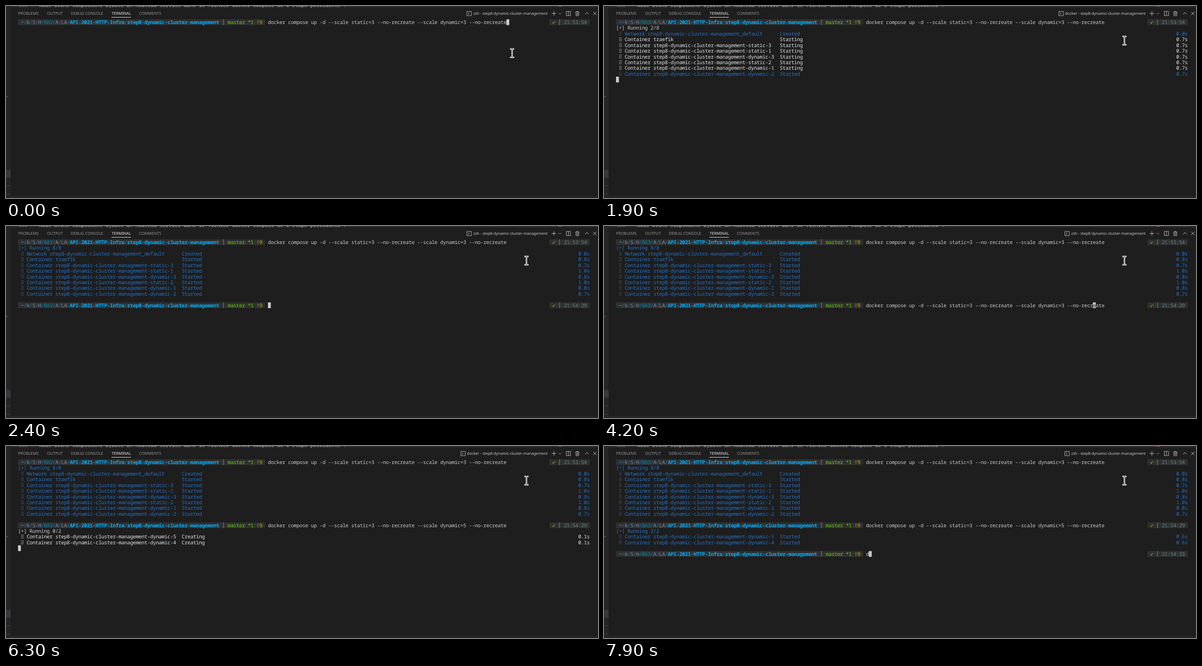
These frames come from a looping animation (1280x416 px, 8 s). An HTML page with a canvas:

```html
<!DOCTYPE html>
<html lang="en">
<head>
<meta charset="utf-8">
<title>Terminal scaling</title>
<style>
html, body { margin: 0; width: 100%; height: 100%; overflow: hidden; background: #1e1e1e; }
canvas { display: block; }
</style>
</head>
<body>
<canvas id="stage" width="1280" height="416"></canvas>
<script>
const ctx = document.getElementById('stage').getContext('2d');
const LOOP = 8000;
// The screen is shown scaled down: 14px type in 8 x 16 px terminal cells.
const SCALE = 0.7764;
const LEFT = 26, TOP = 28.9, CELL = 8 * SCALE, ROW = 16 * SCALE;
const BASELINE = 13 * SCALE;
const MONO = `${14 * SCALE}px "Noto Sans Mono", "DejaVu Sans Mono", monospace`;
const SANS = '"Noto Sans", sans-serif';
const BG = '#1e1e1e', FG = '#cccccc', WHITE = '#e5e5e5', BLUE = '#2472c8';
const ANCHOR = '#00afff', PATH = '#0087af', SHORT = '#8787af', SEGMENT = '#303030';
const PROJECT = 'step8-dynamic-cluster-management';
const INPUT_COL = 87;

const command = count =>
  `docker compose up -d --scale static=3 --no-recreate --scale dynamic=${count} --no-recreate`;
const container = name => `Container ${PROJECT}-${name}`;

// label, final tenths of a second, tick at which it shows as done
const firstRun = [
  [`Network ${PROJECT}_default`, 0, 0, 'Created'],
  ['Container traefik', 8, 8],
  [container('static-3'), 7, 8],
  [container('static-1'), 10, 10],
  [container('dynamic-3'), 8, 8],
  [container('static-2'), 10, 10],
  [container('dynamic-1'), 8, 8],
  [container('dynamic-2'), 7, 7]
];
const secondRun = [
  [container('dynamic-5'), 6, 6],
  [container('dynamic-4'), 6, 6]
];

const cellX = col => LEFT + col * CELL;
const rowY = row => TOP + row * ROW;

function rect(color, x, y, w, h) {
  ctx.fillStyle = color;
  ctx.fillRect(x, y, w, h);
}

function line(color, width, ...paths) {
  ctx.strokeStyle = color;
  ctx.lineWidth = width;
  ctx.beginPath();
  for (const path of paths) {
    path.forEach(([x, y], i) => i ? ctx.lineTo(x, y) : ctx.moveTo(x, y));
  }
  ctx.stroke();
}

function write(text, col, row, color = FG, bold = false) {
  ctx.font = (bold ? 'bold ' : '') + MONO;
  ctx.fillStyle = color;
  [...text].forEach((ch, i) => {
    if (ch !== ' ') ctx.fillText(ch, cellX(col + i), rowY(row) + BASELINE);
  });
  return col + text.length;
}

function label(text, x, size, color, align = 'left') {
  ctx.font = `${size}px ${SANS}`;
  ctx.fillStyle = color;
  ctx.textAlign = align;
  ctx.fillText(text, x, 19.3);
  ctx.textAlign = 'left';
}

function separator(col, row) {
  rect('#949494', cellX(col) + 2.7, rowY(row), 0.9, ROW);
}

function prompt(row, clock) {
  const y = rowY(row);
  rect(SEGMENT, LEFT, y, 86 * CELL, ROW);
  rect(SEGMENT, cellX(185), y, 14 * CELL, ROW);
  let col = write('~', 1, row, ANCHOR, true);
  for (const dir of ['k', 'S', 'H', 'BA3', 'A', 'LA']) {
    col = write('/', col, row, PATH);
    col = write(dir, col, row, dir === 'BA3' ? PATH : SHORT);
  }
  col = write('/', col, row, PATH);
  col = write('API-2021-HTTP-Infra', col, row, ANCHOR, true);
  col = write('/', col, row, PATH);
  write(PROJECT, col, row, ANCHOR, true);
  separator(71, row);
  write('master *1', 73, row, '#5fd700');
  write('!9', 83, row, '#d7af00');
  write('✔', 186, row, '#5faf00');
  separator(188, row);
  write(clock, 190, row, '#5f8787');
}

function cursor(col, row, under = ' ') {
  rect(FG, cellX(col), rowY(row), CELL, ROW);
  write(under, col, row, BG);
}

function bullet(row, color) {
  for (const x of [1.6, 4.7]) {
    for (const y of [2.8, 6, 9.2]) rect(color, cellX(1) + x - 0.7, rowY(row) + y - 0.7, 1.4, 1.4);
  }
}

function progress(jobs, row, tick) {
  const done = jobs.filter(job => tick >= job[2]).length;
  write(`[+] Running ${done}/${jobs.length}`, 0, row, done === jobs.length ? BLUE : FG);
  jobs.forEach(([name, tenths, doneTick, result = 'Started'], i) => {
    const finished = tick >= doneTick;
    const color = finished ? BLUE : WHITE;
    const r = row + 1 + i;
    bullet(r, color);
    write(name, 3, r, color);
    write(finished ? result : tick < 2 ? 'Creating' : 'Starting', 57, r, color);
    write(((finished ? tenths : tick) / 10).toFixed(1) + 's', 195, r, color);
  });
}

function run(t, enter, jobs, row) {
  const tick = Math.floor((t - enter - 100) / 100);
  if (tick > 0) progress(jobs, row, tick);
  return tick > 0 ? row + jobs.length + 1 : row;
}

function editing(t) {
  if (t < 3100) return ['', 0];
  if (t < 3600) return [command(3), 83];
  if (t < 4200) return [command(3), 82];
  if (t < 5500) {
    const step = Math.min(5, Math.floor((t - 4100) / 100));
    return [command(3), 82 - Math.round(step * 2.6)];
  }
  return t < 5600 ? [command(''), 68] : [command(5), 69];
}

function terminal(t) {
  prompt(0, '21:53:54');
  write(command(3), INPUT_COL, 0);
  if (t < 1100) return cursor(INPUT_COL + 83, 0);

  const firstEnd = run(t, 1100, firstRun, 1);
  if (t < 2300) return cursor(0, firstEnd);

  prompt(11, '21:54:29');
  const [text, at] = editing(t);
  write(text, INPUT_COL, 11);
  if (t < 6100) return cursor(INPUT_COL + at, 11, text[at]);

  const secondEnd = run(t, 6100, secondRun, 12);
  if (t < 6900) return cursor(0, secondEnd);

  prompt(16, '21:54:33');
  const typed = t < 7900 ? '' : 'd';
  write(typed, INPUT_COL, 16);
  cursor(INPUT_COL + typed.length, 16);
}

function surroundings() {
  rect(BG, 0, 0, 1280, 416);
  rect('#414141', 10, 1, 1270, 1);
  ctx.save();
  ctx.beginPath();
  ctx.rect(10, 0, 1270, 4);
  ctx.clip();
  ctx.font = MONO;
  ctx.fillStyle = '#858585';
  ctx.fillText('100', 27, 2.3);
  ctx.fillStyle = FG;
  ctx.fillText("*  Nous avons simplement ajouté un nouveau service dans le fichier docker-compose de l'étape précédente :", 52, 2.3);
  ctx.restore();
  rect('#a0543c', 1194, 0, 8, 1);

  rect('#252526', 0, 0, 10, 416);
  rect('#37373d', 0, 355, 10, 17);
  rect('#414141', 0, 389, 10, 1);
  rect('#414141', 0, 407, 10, 1);
  rect('#a8a8a8', 0, 195.5, 1.2, 1.2);
  rect('#a8a8a8', 2.8, 195.5, 1.2, 1.2);
  rect('#252526', 10, 412, 1270, 4);
}

function header(t) {
  const tabs = [['PROBLEMS', 26.2], ['OUTPUT', 89], ['DEBUG CONSOLE', 140],
    ['TERMINAL', 228.4], ['COMMENTS', 287.6]];
  for (const [name, x] of tabs) label(name, x, 11 * SCALE, name === 'TERMINAL' ? '#e7e7e7' : '#969696');
  rect('#e7e7e7', 228, 24, 42, 1);

  const busy = (t >= 1200 && t < 2400) || (t >= 6200 && t < 7000);
  label(`${busy ? 'docker' : 'zsh'} - ${PROJECT}`, 1171, 8.27, FG, 'right');
  const x = busy ? 983 : 996;
  const ink = '#c5c5c5';
  ctx.strokeStyle = ink;
  ctx.lineWidth = 0.9;
  ctx.strokeRect(x + 0.5, 11.8, 9.6, 9.2);
  line(ink, 0.9, [[x + 3, 13.8], [x + 5.8, 16.4], [x + 3, 19]]);

  line(ink, 1, [[1179.8, 16.2], [1189.6, 16.2]], [[1184.7, 11.3], [1184.7, 21.1]]);
  line(ink, 0.8, [[1194.7, 15], [1197.5, 17.8], [1200.3, 15]]);
  ctx.lineWidth = 0.9;
  ctx.strokeRect(1211.5, 11.8, 9, 9);
  line(ink, 0.9, [[1216, 11.8], [1216, 20.8]]);
  line(ink, 0.9,
    [[1230.8, 13.3], [1239.8, 13.3]],
    [[1233.7, 13.3], [1233.7, 11.7], [1236.9, 11.7], [1236.9, 13.3]],
    [[1232, 13.3], [1232.4, 21], [1238.2, 21], [1238.6, 13.3]],
    [[1234.3, 15], [1234.3, 19.3]], [[1236.3, 15], [1236.3, 19.3]]);
  line(ink, 1, [[1252, 18], [1256, 14], [1260, 18]]);
  line(ink, 1, [[1269.6, 12.6], [1276.6, 19.6]], [[1276.6, 12.6], [1269.6, 19.6]]);
}

function pointer(t) {
  const step = Math.min(3, Math.floor(t / 100));
  const ease = 1 - (1 - step / 3) ** 1.3;
  const x = 1094.3 + 31 * ease, y = 102.2 - 27.3 * ease;
  const shape = [
    [[x - 3, y - 9], [x + 3, y - 9]],
    [[x, y - 9], [x, y + 9]],
    [[x - 3, y + 9], [x + 3, y + 9]]
  ];
  ctx.lineCap = 'square';
  line('#ffffff', 3, ...shape);
  line('#202020', 0.7, ...shape);
  ctx.lineCap = 'butt';
}

function draw() {
  const t = (performance.now() - start) % LOOP;
  surroundings();
  header(t);
  terminal(t);
  pointer(t);
  requestAnimationFrame(draw);
}

ctx.textRendering = 'geometricPrecision';
const start = performance.now();
draw();
</script>
</body>
</html>
```
